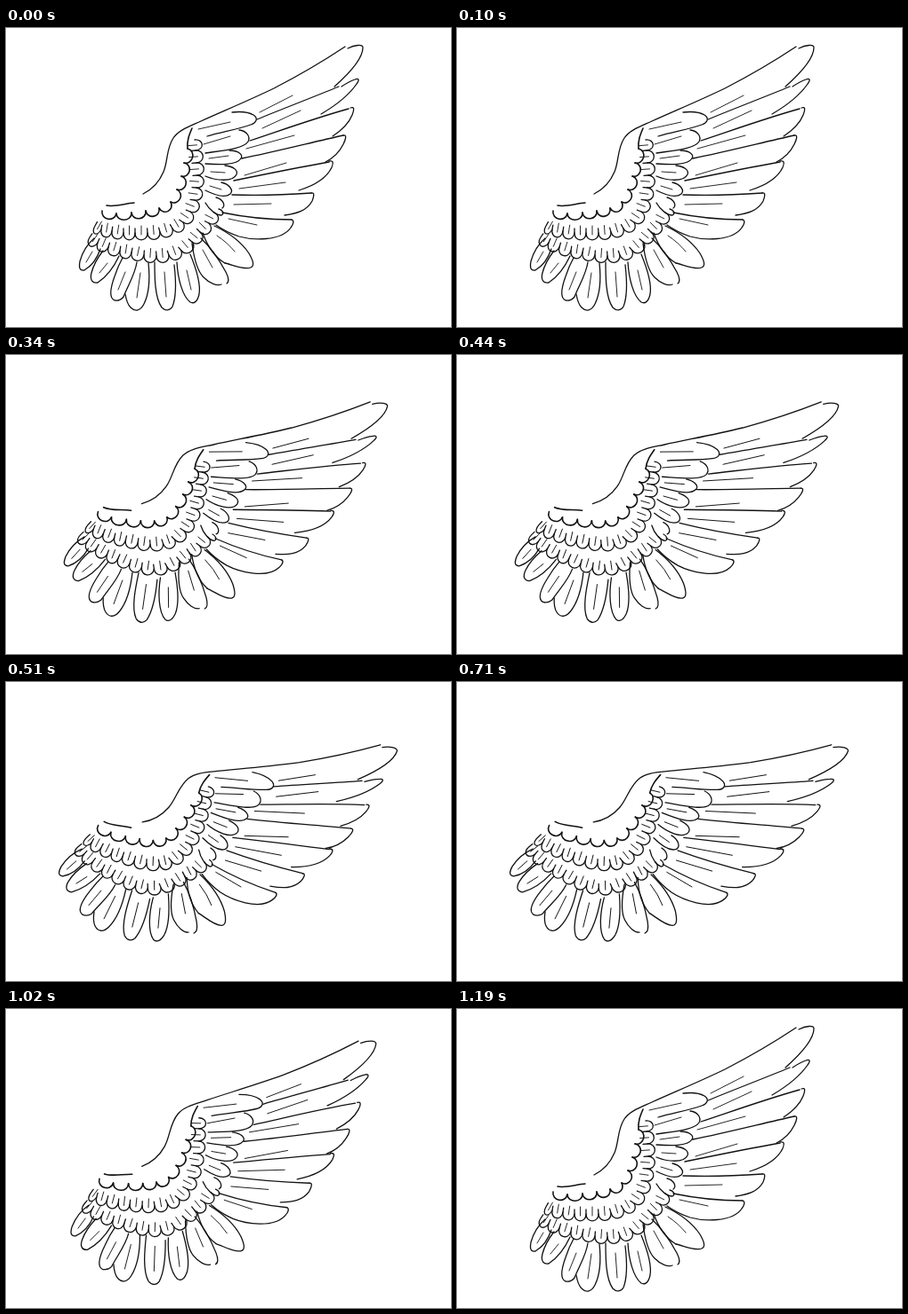
An HTML page that plays this animation: 500 px wide and 337 px high, repeating every 1360 ms.

```html
<!DOCTYPE html>
<html lang="en">
<head>
<meta charset="utf-8">
<title>Wing</title>
<style>
  html, body { margin: 0; height: 100%; overflow: hidden; background: #fff; }
  svg { display: block; width: 100vw; height: 100vh; }
  path { fill: none; stroke: #111; stroke-width: 1.3; stroke-linecap: round; stroke-linejoin: round; }
  .thin path { stroke-width: .9; }
  .bold path { stroke-width: 1.6; }
</style>
</head>
<body>
<svg viewBox="0 0 500 337">
  <g id="wing">
    <!-- leading edge and root -->
    <path d="M381 21C357 37 330 53 301 68C270 83 243 94 219 105C206 111 194 115 188 124C180 136 182 150 177 162C172 174 164 182 154 187"/>
    <g class="bold"><path d="M113 200C122 202 133 198 144 197"/></g>

    <!-- long feathers: tip, then the edge shared with the next one -->
    <path d="M384 23C392 19 401 18 401 22C401 34 387 50 369 66"/>
    <path d="M374 66C345 78 311 91 282 103"/>
    <path d="M377 66Q386 60 392 58C397 56 397 59 394 63C385 76 371 87 354 97"/>
    <path d="M385 91C349 101 310 115 274 127"/>
    <path d="M387 90C392 88 391 93 389 98C385 108 376 116 367 122"/>
    <path d="M379 121C343 129 304 139 265 147"/>
    <path d="M379 121C383 120 382 125 379 131C374 141 367 147 359 151"/>
    <path d="M363 151C329 157 290 165 256 172"/>
    <path d="M363 150C368 149 368 152 366 157C360 170 345 178 329 183"/>
    <path d="M343 186C315 188 283 189 254 188"/>
    <path d="M343 186C347 185 346 190 344 195C338 206 327 209 313 211"/>
    <path d="M321 216C295 216 267 213 243 208"/>
    <path d="M321 216C324 217 323 221 320 225C309 241 276 239 262 235Q247 230 236 222"/>

    <!-- rear feathers -->
    <path d="M234 223C251 231 265 242 273 254C277 261 280 268 275 270C268 273 255 267 246 265"/>
    <path d="M221 231C226 245 234 258 246 265"/>
    <path d="M219 237C231 248 240 262 247 275C250 281 251 286 248 288"/>
    <path d="M209 243C211 258 214 273 222 281C229 288 237 291 242 289"/>
    <path d="M207 255C214 272 219 288 217 300C215 309 211 311 207 309C198 302 193 282 192 264"/>
    <path d="M189 267C191 284 191 304 187 314C184 319 179 319 175 315C167 304 167 280 167 264"/>
    <path d="M160 265C162 284 160 301 155 311C151 319 145 320 140 315C136 311 135 306 134 300"/>
    <path d="M147 264C145 278 137 290 132 303Q128 308 122 307C115 304 118 291 122 280Q126 268 131 259"/>
    <path d="M127 257C121 270 112 281 103 287C97 288 94 284 96 276Q99 264 109 251"/>
    <path d="M106 249C102 261 95 269 88 273C82 274 82 269 83 263C86 252 91 244 99 237"/>

    <!-- middle feathers -->
    <path d="M254 95C263 94 273 95 278 98C284 102 281 107 275 109C262 114 243 117 226 122"/>
    <path d="M262 115C270 116 275 122 272 128C267 136 244 138 224 141"/>
    <path d="M251 138C261 138 267 143 264 147C259 155 240 154 224 153"/>
    <path d="M246 155C255 156 261 160 259 165C255 174 236 172 224 167"/>
    <path d="M242 174C251 176 256 183 252 187C246 192 234 188 224 183"/>
    <path d="M236 191C244 193 247 200 243 203"/>
    <path d="M224 197C229 206 237 211 242 211C246 209 243 205 239 204"/>

    <g class="thin">
      <path d="M285 95L322 76M288 113L331 93M270 136L324 121M268 166L315 152M262 181L314 174M256 199L298 198M250 215L282 222"/>
      <path d="M237 234Q249 242 257 252M221 250L232 270M203 273L208 295M178 275L180 303M151 276L147 304M134 275L126 295M114 265L105 276M97 252L90 264"/>
      <path d="M216 114L252 106M222 131L252 122M228 147L250 144M230 162L246 163M229 178L242 182"/>
    </g>
    <g id="coverts"></g>
    <g id="shafts" class="thin"></g>
    <g id="rim" class="bold"></g>
  </g>
</svg>
<script>
const $ = id => document.getElementById(id);

function draw(group, d) {
  const path = document.createElementNS('http://www.w3.org/2000/svg', 'path');
  path.setAttribute('d', d);
  group.append(path);
}

// A row of rounded feathers hanging between neighbouring points.
function row(group, depth, leg, points) {
  for (let i = 2; i < points.length; i += 2) {
    const [x1, y1, x2, y2] = points.slice(i - 2, i + 2);
    const len = Math.hypot(x2 - x1, y2 - y1);
    const nx = (y1 - y2) / len, ny = (x2 - x1) / len;
    const at = (x, y, k) => `${x + nx * k} ${y + ny * k} `;
    const reach = depth * 1.3;
    draw(group, `M${at(x1, y1, -leg)}L${at(x1, y1, 0)}C${at(x1, y1, reach)}${at(x2, y2, reach)}${at(x2, y2, 0)}`);
    if (leg) {
      const mx = (x1 + x2) / 2, my = (y1 + y2) / 2;
      draw($('shafts'), `M${at(mx, my, -leg - 3)}L${at(mx, my, 2)}`);
    }
  }
}

row($('rim'), 8, 0, [108, 206, 124, 209, 141, 208, 157, 206, 172, 203, 185, 196,
  192, 182, 197, 167, 200, 152, 204, 136]);
draw($('rim'), 'M204 136C203 127 206 120 209 113');
row($('coverts'), 8, 5, [100, 223, 107, 227, 119, 229, 132, 231, 145, 231, 159, 231, 173, 230,
  187, 226, 199, 219, 207, 207, 212, 194, 214, 180, 215, 166, 214, 152, 213, 138, 212, 126]);
row($('coverts'), 8, 5, [94, 236, 103, 242, 115, 247, 128, 251, 141, 253, 155, 256, 169, 257,
  183, 256, 197, 251, 209, 241, 218, 230, 228, 220, 234, 208]);

// The wing swings down in three held steps and back up.
function frame(now) {
  const step = Math.floor(now % 1360 / 170);
  $('wing').setAttribute('transform', `rotate(${6.05 * Math.min(step, 7 - step)} 245 170)`);
  requestAnimationFrame(frame);
}
frame(0);
</script>
</body>
</html>
```
